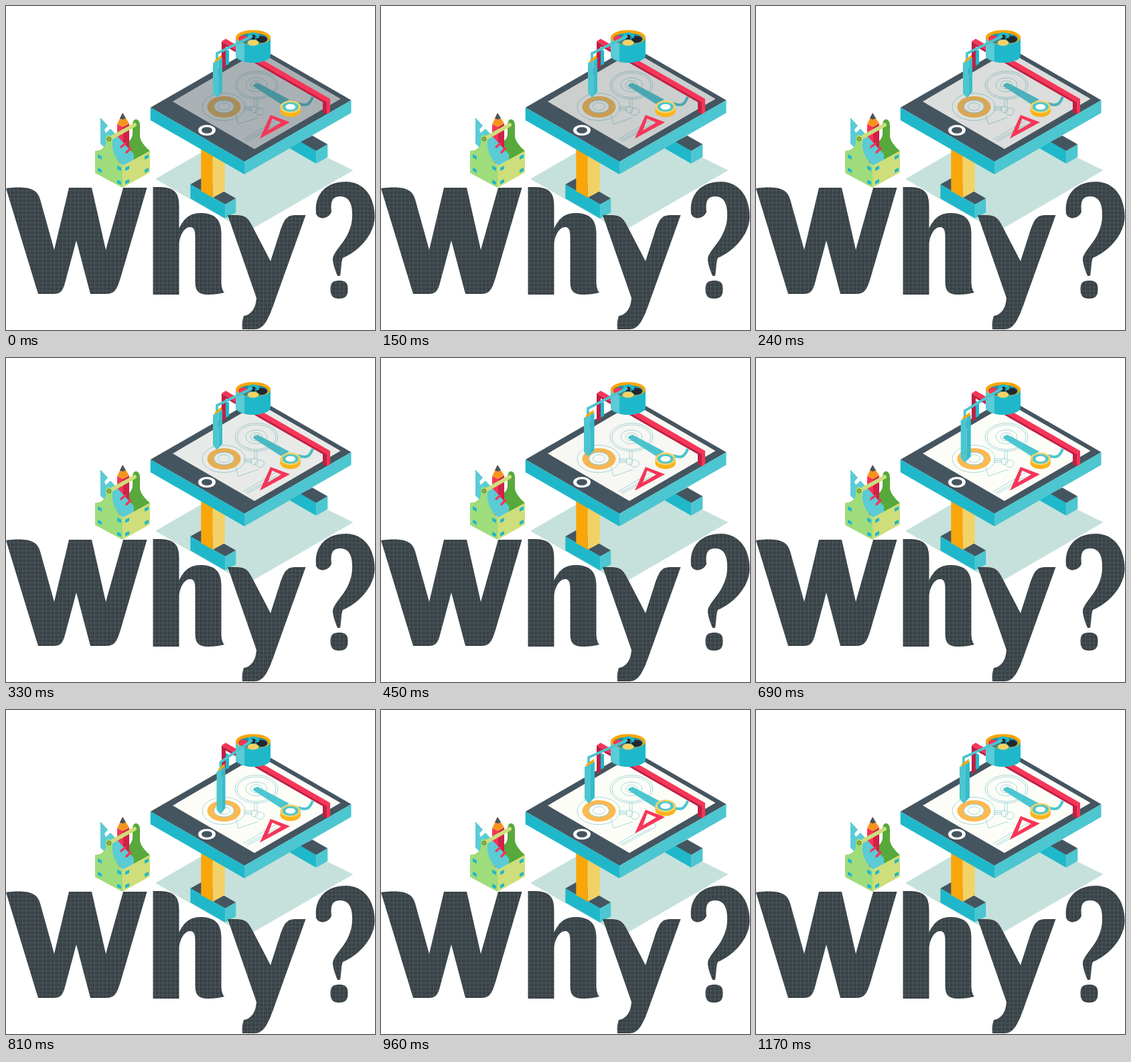
An HTML page for the animation above (1240 ms loop, 551 px wide and 485 px high).

```html
<!DOCTYPE html>
<html lang="en">
<head>
<meta charset="utf-8">
<title>Why?</title>
<style>
html, body { margin: 0; width: 100%; height: 100%; overflow: hidden; background: #fff; }
svg { display: block; width: 551px; height: 485px; }
.teal { fill: #1fb8ca; }
.sky { fill: #4cc6d0; }
.slate { fill: #455560; }
.red { fill: #f73558; }
.wine { fill: #bf1f45; }
.gold { fill: #f9a60a; }
.line { fill: none; stroke: #94ced4; stroke-width: .8; }
</style>
</head>
<body>
<svg viewBox="0 0 551 485" role="img" aria-label="Why?">
  <defs>
    <pattern id="grid" width="6" height="6" patternUnits="userSpaceOnUse">
      <rect width="6" height="6" fill="#384247"/>
      <path d="M0 .5H6M.5 0V6" stroke="#566167" stroke-width=".6"/>
    </pattern>
    <clipPath id="glass"><path d="M249 143L377 68 499.500 139 371 214Z"/></clipPath>
  </defs>

  <!-- floor and feet -->
  <path fill="#c6e1dc" d="M223 259L371 173 518.500 246 360 338Z"/>
  <g transform="translate(-.7 0)">
    <path class="teal" d="M424 190L464 217V236L424 213Z"/>
    <path class="slate" d="M440 203L458 194 481 207 464 217Z"/>
    <path class="sky" d="M464 217L481 207V226L464 236Z"/>
    <path class="slate" d="M276 267L292 258 344 288 328 297Z"/>
    <path class="teal" d="M276 267L328 297V318L276 288Z"/>
    <path class="sky" d="M328 297L344 288V309L328 318Z"/>
    <path class="gold" d="M292 205H309.500V287L292 277Z"/>
    <path fill="#f2d267" d="M309.500 210H327.500V277L309.500 287Z"/>
  </g>

  <!-- table top -->
  <path class="slate" d="M215.700 152L375 60 515.500 141 356 233Z"/>
  <path class="teal" d="M215.700 152L356 233V252L215.700 171Z"/>
  <path class="sky" d="M356 233L515.500 141V160L356 252Z"/>
  <ellipse cx="300" cy="186" rx="13" ry="8" fill="#fff"/>
  <ellipse cx="300" cy="186" rx="8" ry="4.800" class="slate"/>

  <!-- drawing on the glass -->
  <g clip-path="url(#glass)">
    <path fill="#fdfdf8" d="M240 60H510V220H240Z"/>
    <g class="line">
      <ellipse cx="374" cy="118.500" rx="32" ry="21"/>
      <ellipse cx="374" cy="118.500" rx="29" ry="18.500"/>
      <ellipse cx="374" cy="118" rx="16" ry="10.500"/>
      <ellipse cx="374" cy="118" rx="9" ry="6"/>
      <ellipse cx="325" cy="151" rx="32" ry="20.500"/>
      <path d="M371 138V152M375 138V152M355 151H368M355 153.500H367M355 156H368M343 163L347 177 376 167M354 200L405 170 411 171 409 176 360 203M358 201L403 177"/>
      <circle cx="371" cy="155" r="5"/>
      <ellipse cx="379" cy="158" rx="6.500" ry="5.500"/>
    </g>
    <ellipse cx="325.500" cy="151" rx="25" ry="16" fill="#fbb950"/>
    <ellipse cx="325.500" cy="150.500" rx="15" ry="9.500" fill="#fdfdf8" stroke="#94ced4"/>
    <ellipse cx="325.500" cy="150.500" rx="9" ry="5.800" class="line"/>
    <path class="sky" d="M369 120Q369 116 376 115L423 140 411 147Z"/>
    <path fill="none" stroke="#4cc6d0" stroke-width="4" d="M436 146C448 150 453 149 458 136"/>
    <path id="shade" class="slate" d="M240 60H510V220H240Z"/>
  </g>

  <!-- rail -->
  <path class="teal" d="M328 64L333 67V87L328 89Z"/>
  <path class="wine" d="M322 53L479 143.600V162L473 159V144L328 60.500V92L322 95Z"/>
  <path class="red" d="M322 53L328 49 484 139V159L479 162V144Z"/>

  <!-- tool drum -->
  <path class="teal" d="M343 47V74A26 11 0 0 0 395 74V47Z"/>
  <path fill="#5bcbd6" d="M343 47V74Q345 80 356 83V52Z"/>
  <ellipse cx="369" cy="47" rx="26" ry="11" class="gold"/>
  <ellipse cx="369" cy="49" rx="22" ry="8.500" fill="#238f9f"/>
  <ellipse cx="354" cy="49" rx="7" ry="4.500" class="red"/>
  <ellipse cx="382" cy="50" rx="8" ry="5" fill="#20282d"/>
  <ellipse cx="369" cy="55" rx="8.500" ry="4.500" fill="#f2d267"/>
  <path fill="#20282d" d="M366 43H372V50H366Z"/>
  <path fill="none" stroke="#1fb8ca" stroke-width="3.500" d="M363 47V43L369 41 376 43V48"/>

  <!-- pen on its arm -->
  <path id="arm" fill="none" stroke="#4cc6d0" stroke-width="3.800"/>
  <path id="body" fill="#4cc6d0"/>
  <path id="side" fill="#35bccb"/>
  <path id="band" class="gold"/>

  <g id="ring">
    <path fill="#fbb31c" d="M409.500 151V158A15.500 10 0 0 0 440 158V151Z"/>
    <ellipse cx="424.800" cy="151" rx="15.300" ry="9.500" fill="#f2d267"/>
    <ellipse cx="424.800" cy="151" rx="12" ry="7" class="sky"/>
    <ellipse cx="424.800" cy="151" rx="7.500" ry="4.300" fill="#fff"/>
  </g>
  <path id="square" class="red" fill-rule="evenodd" d="M395 163L424 174 379 198.500ZM397.500 168.500L391 186.500 411 174.500Z"/>

  <!-- toolbox -->
  <path fill="#58a93c" d="M174 240L183 203Q189 198 189 190V176Q191 168 196 170 200 172 200 180V196Q202 206 215 217Z"/>
  <path class="red" d="M166 177L175 181V236H166Z"/>
  <path fill="#d0214a" d="M175 181L184 176V236H175Z"/>
  <path fill="#f7941d" d="M166 177L174 160 184 176 175 181Z"/>
  <path class="slate" d="M170 168L174 160 179 168 174 170Z"/>
  <path fill="#5bcbd6" d="M141 167L191 222V240H176L141 206Z"/>
  <path fill="#fff" d="M149 190L161 179 155 176 147 185Z"/>
  <path fill="none" stroke="#f73558" stroke-width="3.500" stroke-linecap="round" d="M172 211L178 206M180 219L186 213"/>
  <path fill="#9fdc7c" d="M133 217Q146 216 149 206V200Q149 192 154 193 159 195 159 201V212Q162 228 174 239V272L133 250Z"/>
  <path fill="#cede7a" d="M174 239L215 217V249L174 272Z"/>
  <path stroke="#cede7a" stroke-width="6" stroke-linecap="round" d="M156 198L192 178"/>
  <circle cx="154" cy="199" r="3.500" fill="#58a93c"/>
  <circle cx="154" cy="199" r="1.700" fill="#f7941d"/>
  <path id="plates" class="teal"/>

  <!-- lettering -->
  <g fill="url(#grid)">
    <path d="M0 273C12 271 26 271 34 273C45 276 49 281 52 293L72 365 94 272H128L149 365 175 272H210.500L171 407C165 426 162 431 148 431H126L105 351 89 411C85 427 82 431 70 431H48Z"/>
    <path d="M219.500 271H229C251 271 258.500 279 258.500 300V333C266 317 275 310 291 310C312 310 321.500 320 321.500 340V411C321.500 421 323 425 326 429C318 431 311 432 303 432C287 432 282.500 427 282.500 411V347C282.500 336 281 331 275 331C266 331 258.500 344 258.500 359V432H219.500Z"/>
    <path d="M331 313H342C356 313 361 316 367 328L395 382 409 338C416 317 420 313 434 313H447.500L401 443C391 472 384 484 371 484H353C352 476 353 470 355 464C366 462 373 453 374 437Z"/>
    <path d="M463 311C460 282 478 263 507 263C535 263 550.500 286 550.500 315C550.500 342 527 367 503 377C500 384 501 394 499 404H495C491 394 488 386 488 378C490 363 517 348 517 313C517 294 511 285 499 285C488 285 484 292 486 308C482 319 467 321 463 311Z"/>
    <path d="M484.500 424C484.500 414 488 411 497.500 411C507 411 510.500 414 510.500 424C510.500 434 507 438 497.500 438C488 438 484.500 434 484.500 424Z"/>
  </g>
</svg>
<script>
const LOOP = 1240, STEP = 30, LAST = 39;
const $ = id => document.getElementById(id);
const draw = (id, d) => $(id).setAttribute('d', d);
const lift = (id, y) => $(id).setAttribute('transform', `translate(0 ${-y})`);

// time, left, right, top, tip
const poses = [
  [0, 309, 323, 85, 137],
  [330, 309, 323, 85, 137.5],
  [570, 297, 314, 94, 157],
  [810, 314.5, 327.5, 92, 156],
  [960, 304, 319, 85, 140],
  [LOOP, 304, 319, 85, 140]
];

function pose(t) {
  const i = poses.findIndex((p, n) => n && t <= p[0]);
  const a = poses[i - 1], b = poses[i];
  const u = (t - a[0]) / (b[0] - a[0]);
  const e = u * u * (3 - 2 * u);
  return a.slice(1).map((v, n) => v + (b[n + 1] - v) * e);
}

function pen([l, r, top, tip]) {
  const m = l + (r - l) * .6, x = l + 6;
  draw('arm', `M368 45L${x} ${top - 14}V${top}`);
  draw('body', `M${l} ${top}L${m} ${top - 4}V${tip - 5}L${x} ${tip}L${l} ${tip - 7}Z`);
  draw('side', `M${m} ${top - 4}L${r} ${top - 8}V${tip - 9}L${x} ${tip}L${m} ${tip - 6}Z`);
  draw('band', `M${l + 2} ${top}L${l + 3} ${top - 4}L${r - 1} ${top - 12}V${top - 7}Z`);
}

function render(t) {
  $('shade').setAttribute('opacity', .45 * Math.max(0, 1 - t / 540) ** 1.5);
  pen(pose(t));
  const hop = t > 840 && t < 1200 ? Math.sin((t - 840) / 360 * Math.PI) : 0;
  lift('square', 16 * hop);
  lift('ring', 8.5 * hop);
}

const plate = ([x, y, s]) => `M${x} ${y}l6 ${s}v5l-6 ${-s}Z`;
draw('plates', [
  [137, 222, 3], [137, 242, 3], [166, 239, 3], [166, 260, 3],
  [178, 242, -3], [178, 262, -3], [207, 225, -3], [207, 245, -3]
].map(plate).join(''));

const start = performance.now();
function tick(now) {
  const t = Math.max(0, now - start) % LOOP;
  render(Math.min(LAST, Math.floor(t / STEP)) * STEP);
  requestAnimationFrame(tick);
}
render(0);
requestAnimationFrame(tick);
</script>
</body>
</html>
```
